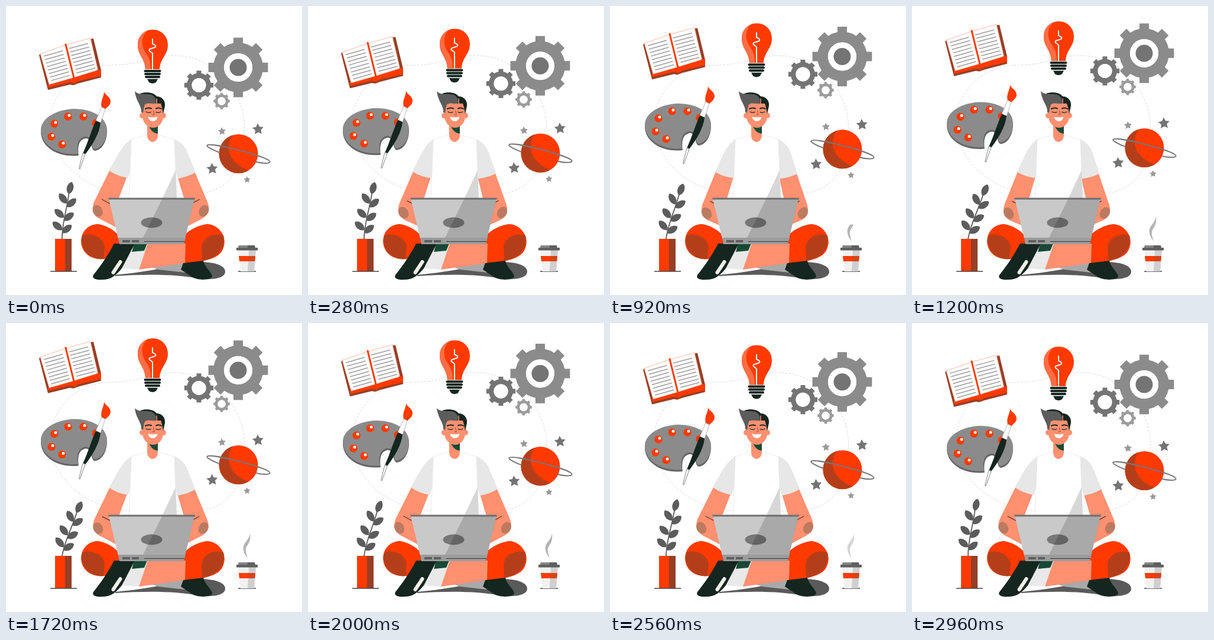
An HTML page for the animation above (3 s loop, 501 by 489 pixels).

```html
<!DOCTYPE html>
<html lang="en">
<head>
<meta charset="utf-8">
<title>Creative thinking</title>
<style>
html, body { margin: 0; width: 100%; height: 100%; overflow: hidden; background: #fff; }
svg { display: block; width: 100%; height: 100%; }
.orange { fill: #ff3a00; } .rust { fill: #b53e1a; } .brown { fill: #963f26; }
.skin { fill: #ff9070; } .dark { fill: #14261f; } .grey { fill: #8b8b8b; } .slate { fill: #747474; }
.line { fill: none; stroke-linecap: round; stroke-linejoin: round; }
</style>
</head>
<body>
<svg viewBox="0 0 501 489" xmlns="http://www.w3.org/2000/svg">
<defs>
  <clipPath id="steamClip"><rect id="steamMask" x="395" y="350" width="25" height="50"/></clipPath>
  <clipPath id="planetClip"><circle cx="393.5" cy="250" r="33"/></clipPath>
  <clipPath id="bulbClip"><path id="bulbShape" d="M223 66C223 51 234 40 248.500 40S274 51 274 66C274 83 261 88 260 107H236C235 88 223 83 223 66Z"/></clipPath>
</defs>

<path class="line" stroke="#dcdcdc" stroke-dasharray="3 3" d="M74 195C77 150 114 100 180 100C230 100 240 84 285 84C350 84 404 140 404 210C404 270 380 318 315 318H210C120 312 74 250 74 195Z"/>

<g id="book">
  <path class="brown" d="M56 83L60 80L75 132L160 108L161 121L122 131L114 134L108 133L71 142ZM142 56L148 55L161 109L154 112Z"/>
  <path class="orange" d="M70 133L112 122L161 107L161 118L122 127L116 131L108 129L72 138Z"/>
  <path fill="#fff" stroke="#ff9a7c" stroke-width=".7" d="M58 81L101 66L143 54.500L155.500 108L115 121L73 133Z"/>
  <path class="line" stroke="#ff3a00" stroke-width="3" stroke-linecap="butt" d="M101 65L115 122"/>
  <g id="textLines" stroke="#a9a9a9" stroke-width="1.8"></g>
</g>

<g id="palette">
  <path fill="#666" d="M59 212C60 193 86 178 115 177C150 177 172 194 171 214C170 231 162 244 150 245C143 243 146 224 135 224C123 226 121 238 123 253C86 257 58 237 59 212Z"/>
  <path class="grey" d="M59 209C60 189 86 175 115 174C150 174 172 191 171 211C170 228 162 240 150 242C143 240 147 221 135 221C121 222 119 237 122 250C86 254 58 233 59 209Z"/>
  <g id="paints"></g>
  <path class="orange" d="M166 144C166 150 176 152 177 161C177 169 170 171 168 175L162 172C159 159 166 155 166 144Z"/>
  <path fill="#fff" stroke="#999" stroke-width=".7" d="M162 171L168 174L160 198L152 194Z"/>
  <path class="dark" d="M152 194L160 197.500C158 216 147 234 134.500 250.500L130.500 248.500C139 230 144 212 152 194Z"/>
  <path fill="#fff" stroke="#777" stroke-width=".9" d="M130 249L134 251L125 276L123.500 275Z"/>
</g>

<g id="bulb">
  <use href="#bulbShape" class="orange"/>
  <path clip-path="url(#bulbClip)" fill="#ff6d45" d="M220 38H246C229 45 226 65 237 80C244 90 245 97 245 108H220Z"/>
  <path class="line" stroke="#fff" stroke-width="2" d="M248 107V80L243 76Q241 73 246 72L252 70Q256 67 248 64V56"/>
  <path class="line" stroke="#14261f" stroke-width="4" d="M235.500 110H260.500M236 115H260M237 120H259"/>
  <path class="dark" d="M239 123.500H257L254 129Q248 133 242 129Z"/>
</g>

<g id="gears"></g>

<g id="space">
  <circle class="orange" cx="393.5" cy="250" r="33"/>
  <path class="rust" clip-path="url(#planetClip)" d="M358 215H387C370 232 372 264 412 279V284H358Z"/>
  <path class="line" stroke="#777" stroke-width="2" transform="translate(393.5 250) rotate(14.5)" d="M-32 6C-44 5 -55 2 -55 0C-55 -8 55 -8 55 0C55 3 44 6 32 6"/>
  <g id="stars"></g>
</g>

<g id="plant">
  <path class="line" stroke="#5c5c5c" stroke-width="1.8" d="M95 396C94 368 104 342 107 313"/>
  <g id="leaves" fill="#5c5c5c"></g>
</g>
<path class="orange" d="M83 394H101V449H83Z"/>
<path class="brown" d="M100 394H111V449H100Z"/>
<path stroke="#444" stroke-width="1.4" d="M75 449H120M393 449H423"/>

<path id="steam" fill="#b4b4b4" clip-path="url(#steamClip)" d="M413 356C411 369 400 372 402 384C403 391 407 395 409 398C406 388 404 383 408 377C413 370 414 365 413 356Z"/>
<path fill="#f1f1f1" d="M393 413H423L420 449H397Z"/>
<path fill="#cfcfcf" d="M411 413H423L420 449H409Z"/>
<path class="orange" d="M394 423H422L421 432H395Z"/>
<path fill="#d94318" d="M410 423H422L421 432H410Z"/>
<path fill="#5f5f5f" d="M394 405H421L422 409H426V413.500H390V409H393Z"/>
<path fill="#858585" d="M394 405H409V409H393Z"/>

<path fill="#5a5a5a" d="M185 455C230 451 265 444 300 436C340 429 372 436 371 450C370 462 345 464 325 461C290 454 240 453 185 457Z"/>

<g id="leftArm">
  <path class="skin" d="M175 278L149 330C143 343 147 354 158 360L196 380L190 326L204 290Z"/>
  <ellipse cx="154.500" cy="346.500" rx="8" ry="10.500" fill="#bd7a60" transform="rotate(-28 154.500 346.500)"/>
  <path class="line" stroke="#5b3a2e" stroke-width="1.300" d="M162 327L175 334"/>
  <path fill="#e7e7e7" d="M213 225C203 231 197 239 190 250L174 278Q188 288 206 291L213 270Z"/>
</g>
<g id="rightArm">
  <path class="skin" d="M320 281L341 330C347 343 343 354 332 360L294 380L302 326L291 290Z"/>
  <ellipse cx="335.500" cy="346.500" rx="8" ry="10.500" fill="#bd7a60" transform="rotate(28 335.500 346.500)"/>
  <path class="line" stroke="#5b3a2e" stroke-width="1.300" d="M328 327L315 334"/>
  <path fill="#e7e7e7" d="M284 225C296 230 303 237 307 247L321 281Q308 289 291 292L284 270Z"/>
</g>

<path fill="#fff" stroke="#e4e4e4" stroke-width=".7" d="M238 218L212 226L208 330H289L285 226L258 218Z"/>
<path fill="#d7d7d7" d="M287 278L264 327H289Z"/>
<path class="skin" d="M239 198H257V219C257 226 252 230 248 230S239 226 239 219Z"/>
<path fill="#174a36" d="M241 201Q250 206 257 200V216Q246 215 241 201Z"/>
<circle class="skin" cx="230.500" cy="185.500" r="4.500"/><circle class="skin" cx="266.500" cy="185.500" r="4.500"/>
<path class="skin" d="M231 160H266V186C266 198 258 206 249 206S231 198 231 186Z"/>
<path class="dark" d="M227 148C239 144 251 147 255 153C264 153 270 160 269 169L266 183C265 176 264 171 262 165H252Z"/>
<path fill="#5c5c5c" d="M218 144C225 152 236 147 246 150C253 153 255 159 253 165C246 166 239 163 235 167C233 171 233 176 232 181L229 180C230 168 220 162 218 144Z"/>
<g class="line" stroke="#14261f" stroke-width="2">
  <path d="M236 174Q241 171.500 246 173.500M254 173.500Q259 171.500 263 174"/>
  <path stroke-width="1.300" d="M237 179Q241 181.500 245 179.500M254 179.500Q258 181.500 262 179"/>
</g>
<path class="line" stroke="#c7593d" stroke-width="1.300" d="M249.500 177L251 184H248"/>
<path class="line" stroke="#ff9070" stroke-width="1.5" d="M255 157V165"/>
<path fill="#fff" d="M240.500 187.500Q249 189.500 256.500 187.500Q255 195 248.500 195T240.500 187.500Z"/>

<path class="orange" d="M127 397C128 379 142 369 156 369C169 371 181 378 191 388L196 409L169 428C143 431 127 417 127 397Z"/>
<path class="rust" d="M129 388C146 383 164 392 167 407L165 428C140 430 124 410 129 388Z"/>
<path class="orange" d="M300 389C312 378 325 371 340 369C360 369 378 392 366 414C359 427 337 432 303 437Z"/>
<path class="rust" d="M368 388C350 383 334 392 331 407L332 431C355 428 373 412 368 388Z"/>
<path fill="#e9e9e9" d="M214 403H240L226 446L193 444Z"/>
<path fill="#a9a9a9" d="M246 442L302 434L312 452L258 446Z"/>
<path class="skin" d="M240 402L304 402L303 435L225 446Z"/>
<path fill="#174a36" d="M217 402H239L234 414L213 416Z"/>
<path class="dark" d="M183 402H218L196 444C186 456 178 463 163 463C150 464 145 460 148 455C160 440 172 423 183 402Z"/>
<path class="line" stroke="#f3eee9" stroke-width="6" d="M181.500 451L193.500 433"/>
<path class="dark" d="M300 435L334 431C336 442 349 451 349 458C344 465 322 464 314 458L296 446Z"/>

<path fill="#c9c9c9" d="M174 326H319L303 394H190Z"/>
<path fill="#707070" d="M173 324.500H320L319.500 327.500H174Z"/>
<ellipse cx="246.5" cy="366.5" rx="18" ry="9" fill="#777"/>
<path fill-opacity=".16" d="M264 327H319L303 394H231Z"/>
<path fill="#9c9c9c" d="M190 392H304L301 403H192Z"/>
<path fill="#5f5f5f" d="M197 396H210V400H197ZM213 396H225V400H213Z"/>
<path stroke="#353535" d="M234 398.500H302"/>
</svg>

<script>
const PERIOD = 3000, STEP = 40;
const $ = id => document.getElementById(id);
const range = n => [...Array(n).keys()];

function polar(r, angle) {
  return `${(r * Math.cos(angle)).toFixed(2)} ${(r * Math.sin(angle)).toFixed(2)}`;
}

function gear(x, y, body, hole, tooth, color) {
  const teeth = range(8).map(i =>
    `<rect x="${-tooth / 2}" y="${-body * 1.2}" width="${tooth}" height="${body * 0.4}" transform="rotate(${i * 45})"/>`).join('');
  return `<g transform="translate(${x} ${y})" fill="${color}">${teeth}
    <circle r="${(body + hole) / 2}" fill="none" stroke="${color}" stroke-width="${body - hole}"/>
    <circle r="${hole}" fill="#fff"/></g>`;
}

function star(x, y, r, color) {
  const points = range(10).map(i => polar(i % 2 ? r * 0.5 : r, (i * 36 - 94) * Math.PI / 180));
  return `<polygon transform="translate(${x} ${y})" fill="${color}" points="${points.join(' ')}"/>`;
}

function leaf(x, y, angle) {
  return `<path transform="translate(${x} ${y}) rotate(${angle})" d="M0 0C-8 -5 -7 -17 0 -21C7 -17 8 -5 0 0Z"/>`;
}

$('textLines').innerHTML = range(8).map(i => {
  const dx = i * 1.75, y = i * 5.9;
  return `<path d="M${64 + dx} ${85 + y}L${96 + dx} ${76 + y}M${107 + dx} ${72 + y}L${139 + dx} ${63.5 + y}"/>`;
}).join('');

$('paints').innerHTML = [[82, 199], [105, 187], [131, 187], [152, 198], [77, 221], [95, 234]].map(([x, y]) =>
  `<circle class="orange" cx="${x}" cy="${y}" r="6.7"/><circle cx="${x + 2}" cy="${y - 2}" r="2.5" fill="#fff"/>`).join('');

$('gears').innerHTML = gear(393, 104, 42, 24, 16, '#8b8b8b') +
  '<circle class="slate" cx="393" cy="104" r="14.5"/>' +
  gear(326.5, 134, 20.5, 12, 8, '#747474') + gear(365, 161, 11.5, 6.7, 4.5, '#9b9b9b');

$('stars').innerHTML = star(365.5, 212, 7, '#999') + star(426.5, 208.5, 10, '#747474') +
  star(349, 275.5, 10, '#747474') + star(408, 294, 6, '#999');

$('leaves').innerHTML = [
  [106, 318, 14], [103, 334, -38], [103, 340, 48], [98, 358, -48],
  [98, 363, 52], [95, 379, -50], [95, 384, 50]
].map(args => leaf(...args)).join('');

const clamp = v => Math.min(1, Math.max(0, v));
const wave = v => (1 - Math.cos(Math.PI * v)) / 2;
const ease = (t, from, to) => wave(clamp((t - from) / (to - from)));

const lifts = { book: 25, palette: 12.5, bulb: 15, gears: 26, space: 10.7 };

function render(t) {
  const swing = wave(2 * (t + STEP) / PERIOD);
  for (const id in lifts) $(id).setAttribute('transform', `translate(0 ${-lifts[id] * swing})`);
  $('plant').setAttribute('transform', `rotate(${11 * swing} 95 394)`);

  const tuck = 4.5 * (ease(t, -100, 460) - ease(t, 1300, 1860) + ease(t, 2900, 3460));
  $('leftArm').setAttribute('transform', `rotate(${-tuck} 212 232)`);
  $('rightArm').setAttribute('transform', `rotate(${tuck} 284 232)`);

  $('steamMask').setAttribute('y', 398 - 42 * clamp((t - 380) / 800));
  $('steam').setAttribute('opacity', 1 - clamp((t - 2300) / 600));
}

const start = performance.now();
function frame() {
  const t = (performance.now() - start) % PERIOD;
  render(Math.floor(t / STEP) * STEP);
  requestAnimationFrame(frame);
}
frame();
</script>
</body>
</html>
```
